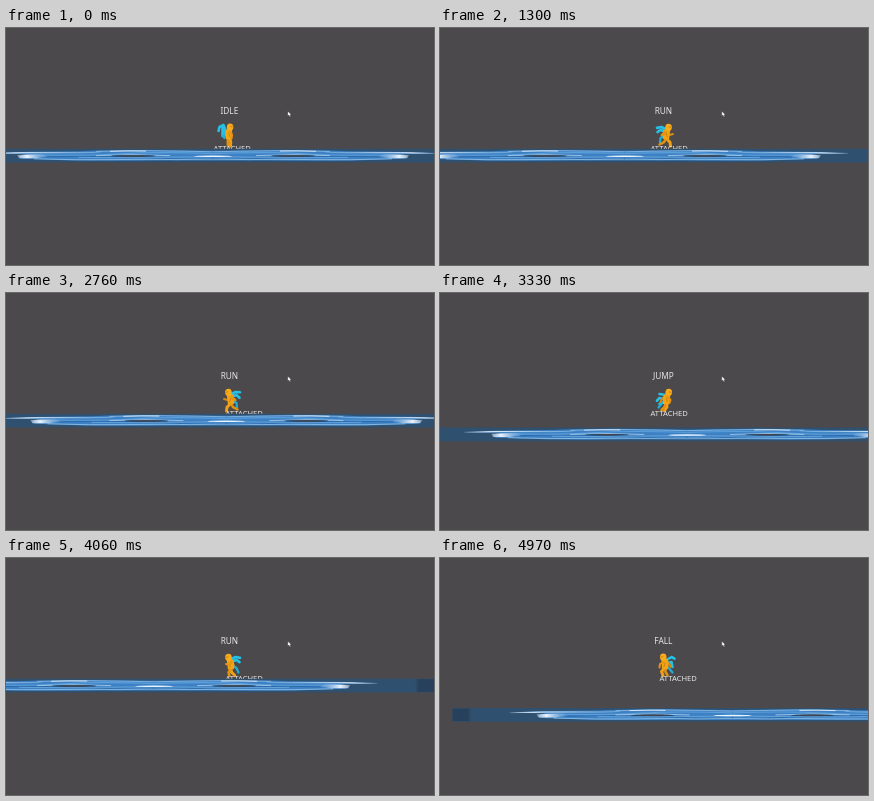
An HTML page for the animation above (5000 ms loop, 428 by 237 pixels).

```html
<!DOCTYPE html>
<html lang="en">
<head>
<meta charset="utf-8">
<title>Platform run</title>
<style>
  html, body { margin: 0; width: 100%; height: 100%; overflow: hidden; background: #4b494b; }
  svg { display: block; width: 100vw; height: 100vh; }
  text { font-family: "Noto Sans", "Open Sans", sans-serif; fill: #e6e6e6; text-anchor: middle; }
  .limb { fill: none; stroke-linecap: round; stroke-linejoin: round; }
</style>
</head>
<body>
<svg viewBox="0 0 428 237">
  <defs>
    <filter id="soft" filterUnits="userSpaceOnUse" x="-80" y="115" width="572" height="25">
      <feGaussianBlur stdDeviation=".5 .3"/>
    </filter>
    <linearGradient id="foam">
      <stop offset="0" stop-color="#fff" stop-opacity=".35"/>
      <stop offset=".3" stop-color="#fff" stop-opacity=".9"/>
      <stop offset="1" stop-color="#b5d8f4" stop-opacity="0"/>
    </linearGradient>
    <linearGradient id="wisp" gradientUnits="userSpaceOnUse" x1="-16" x2="95" y1="0" y2="0">
      <stop offset="0" stop-color="#fff" stop-opacity=".15"/>
      <stop offset=".22" stop-color="#fff"/>
      <stop offset="1" stop-color="#9ccdf2" stop-opacity=".45"/>
    </linearGradient>
    <linearGradient id="cap">
      <stop offset="0" stop-color="#27405b"/>
      <stop offset=".8" stop-color="#27405b"/>
      <stop offset="1" stop-color="#2f506f"/>
    </linearGradient>
    <g id="half">
      <rect x="-73" y="121.2" width="19" height="12.6" fill="url(#cap)"/>
      <path d="M-16 125.4Q12 123.4 50 123.4Q75 123.2 94 122.4Q135 121.4 178 122.4L207.3 122.8V132.6L150 132.4Q105 133.2 65 132.4L16 130.8Q8 128.7 20 126Z" fill="#3d80c3"/>
      <g fill="none">
        <path d="M40 129Q90 127 150 130T207 130" stroke="#2c69a8" stroke-width="1.1"/>
        <path d="M35 127Q80 128 115 125.8T207 125.6" stroke="#5b9fdb" stroke-width="1.1"/>
        <path d="M-16 125.4Q20 124.4 55 124.7T95 123.8" stroke="url(#wisp)"/>
        <path d="M90 123.4Q135 121.9 180 123.2L207 123.8" stroke="#98c5ea" stroke-width=".7"/>
        <path d="M104 123.3Q122 122.6 140 123.1" stroke="#fff" stroke-width=".7"/>
        <path d="M28 130.8Q70 132.2 108 131.6T170 131.6L207 131.2" stroke="#a3cdee" stroke-width=".7"/>
        <path d="M72 129.3Q100 129.8 135 129.5T207 128.6" stroke="#7fb9e8" stroke-width=".6"/>
        <path d="M90 127.6Q127 125.8 164 127.6" stroke="#d3e8f8" stroke-width=".6"/>
      </g>
      <ellipse cx="127" cy="127.9" rx="22" ry=".75" fill="#1d3b58"/>
      <ellipse cx="127" cy="127.9" rx="14" ry=".5" fill="#594844"/>
      <path d="M11 127L34 126.2L44 128L30 130.2L13 130.2Z" fill="url(#foam)"/>
    </g>
  </defs>

  <rect width="428" height="237" fill="#4b494b"/>
  <text id="state" x="223.4" y="85.8" font-size="8.3"></text>
  <g id="hero">
    <path id="scarf" class="limb" stroke="#27c0e4" stroke-width="2.6"/>
    <path id="backLeg" class="limb" stroke="#22aed6" stroke-width="2.2"/>
    <path id="backArm" class="limb" stroke="#d88a10" stroke-width="1.9"/>
    <path id="frontLeg" class="limb" stroke="#f0a016" stroke-width="3"/>
    <path id="rearLeg" class="limb" stroke="#e2920f" stroke-width="2.5"/>
    <g id="torso">
      <path d="M-3 -17Q0 -18.8 3.6 -17L3.6 -8L-2.4 -7.6Q-4 -12 -3 -17Z" fill="#f3a414"/>
      <ellipse cx="1.6" cy="-20" rx="3.3" ry="3.6" fill="#f8ac1c"/>
      <path d="M1.6 -20.4H4.4M0 -14.5L1.5 -10" fill="none" stroke="#c47a0c" stroke-width=".8"/>
    </g>
    <path id="frontArm" class="limb" stroke="#e89412" stroke-width="2"/>
  </g>
  <text id="attached" y="123.2" font-size="7.6">ATTACHED</text>
  <g id="platform">
    <g filter="url(#soft)">
      <rect x="-73" y="120.7" width="559" height="13.7" rx="1" fill="#2f506f"/>
      <use href="#half"/>
      <use href="#half" transform="matrix(-1 0 0 1 414 0)"/>
      <ellipse cx="207" cy="128.2" rx="19" ry=".8" fill="#e9f5fd"/>
    </g>
  </g>
  <path d="M281.8 83.2V88L283 87L283.8 88.8L284.8 88.4L284 86.7H285.4Z" fill="#fff" stroke="#222" stroke-width=".3"/>
</svg>
<script>
const LOOP = 5000;
const FLIGHT = 627;
const PEAK = 51;
const STRIDE = 487;
const jumps = [3285, 4453];
const scroll = [[-100, 0], [0, 0], [500, 3], [1140, 3], [1835, -105], [1999, -105],
                [3132, 71], [4017, -66], [5100, 106]];
const states = [[0, "IDLE"], [1075, "RUN"], [1830, "IDLE"], [1970, "RUN"], [3105, "IDLE"],
                [3160, "RUN"], [3285, "JUMP"], [3598, "FALL"], [3912, "RUN"],
                [4453, "JUMP"], [4766, "FALL"]];
const facing = [[0, 1], [1970, -1], [3132, 1], [4017, -1]];

const el = id => document.getElementById(id);
const set = (id, name, value) => el(id).setAttribute(name, value);
const latest = (list, t) => list.filter(([start]) => start <= t).pop()[1];

function along(keys, t) {
  const i = Math.max(1, keys.findIndex(([time]) => time >= t));
  const [t0, a] = keys[i - 1], [t1, b] = keys[i];
  return a + (b - a) * (t - t0) / (t1 - t0);
}

// Averaging over a short window rounds off starts, stops and turns.
function scrollAt(t) {
  let sum = 0;
  for (let d = -50; d <= 50; d += 10) sum += along(scroll, t + d);
  return sum / 11;
}

function heightAt(t) {
  const start = jumps.find(s => t >= s && t < s + FLIGHT);
  if (start === undefined) return 0;
  const u = (t - start) / FLIGHT;
  return 4 * PEAK * u * (1 - u);
}

const limb = (x, y, kneeX, kneeY, endX, endY) =>
  `M${x} ${y}L${kneeX} ${kneeY}L${endX} ${endY}`;

function pose(state, t) {
  const swing = Math.cos((t - 1300) / STRIDE * 2 * Math.PI);
  const leg = s => limb(0.5, -8.5, 1.5 + 3 * s, -4.8, 5.5 * s - 0.5, -1 - Math.max(0, -s) * 1.5);
  const arm = s => limb(0, -15.5, 4 * s, -12, 4 * s + 3.5, -13);
  const flutter = Math.sin(t / 90);

  if (state === "IDLE") return {
    lean: 0,
    scarf: `M-3 -17L-5 -22L-9 -20L-10 ${-16 + flutter * .3}M-6 -20L-6 -11M-4 -18V-12`,
    frontLeg: limb(1.5, -8.5, 2.2, -5, 2, -1), rearLeg: limb(-.5, -8.5, -.8, -5, -.6, -1.5),
    backLeg: limb(-4, -12, -5, -10, -4, -9),
    frontArm: limb(2, -15.5, 3.5, -12, 3, -8.5), backArm: limb(-1.5, -15, -2.5, -11, -1, -9)
  };
  if (state === "RUN") return {
    lean: 7,
    scarf: `M1 -17.5L-4 -20L-8.5 ${-19.5 + flutter * .4}M-2 -16L-5 -17L-8 ${-14.5 - flutter * .4}`,
    frontLeg: leg(swing), rearLeg: leg(-swing),
    backLeg: limb(-2, -11, -5, -9, -6.5 + swing, -4.5),
    frontArm: arm(-swing), backArm: arm(swing)
  };
  const rising = state === "JUMP";
  return {
    lean: rising ? 8 : 3,
    scarf: rising ? `M0 -17L-6 -18M-1 -13L-6 -14L-8.5 ${-11 + flutter * .4}M-2 -10L-6 -8`
                  : `M-1 -17L-6 -20L-9 ${-18 + flutter * .4}M-2 -14L-6 -15L-7 -10`,
    frontLeg: rising ? limb(1, -8.5, 1.5, -5, -1, -1.5) : limb(1, -8.5, 4, -5.5, 2.5, -1.5),
    rearLeg: rising ? limb(0, -8.5, -1, -5, -4, -2) : limb(0, -8.5, 0, -5, -2, -2),
    backLeg: limb(-2, -10, -5, -7, -7, -4.5),
    frontArm: rising ? limb(2, -15.5, 5, -12, 4, -9) : limb(2, -15, 5.5, -13, 6, -9.5),
    backArm: limb(-1, -15, -4, -13, -5, -10)
  };
}

function draw(t) {
  const state = latest(states, t);
  const side = latest(facing, t);
  const settle = t < 1140 ? along(scroll, t) - 3 : 0;
  const { lean, ...parts } = pose(state, t);
  for (const id in parts) set(id, "d", parts[id]);
  set("torso", "transform", `rotate(${lean} 0 -8)`);
  set("hero", "transform", `translate(${225.5 + settle} 119) scale(${side} 1)`);
  set("attached", "x", (side > 0 ? 229.2 : 238.2) + settle);
  set("platform", "transform", `translate(${scrollAt(t)} ${heightAt(t)})`);
  el("state").textContent = state;
}

const begin = performance.now();
function tick() {
  draw((performance.now() - begin) % LOOP);
  requestAnimationFrame(tick);
}
tick();
</script>
</body>
</html>
```
